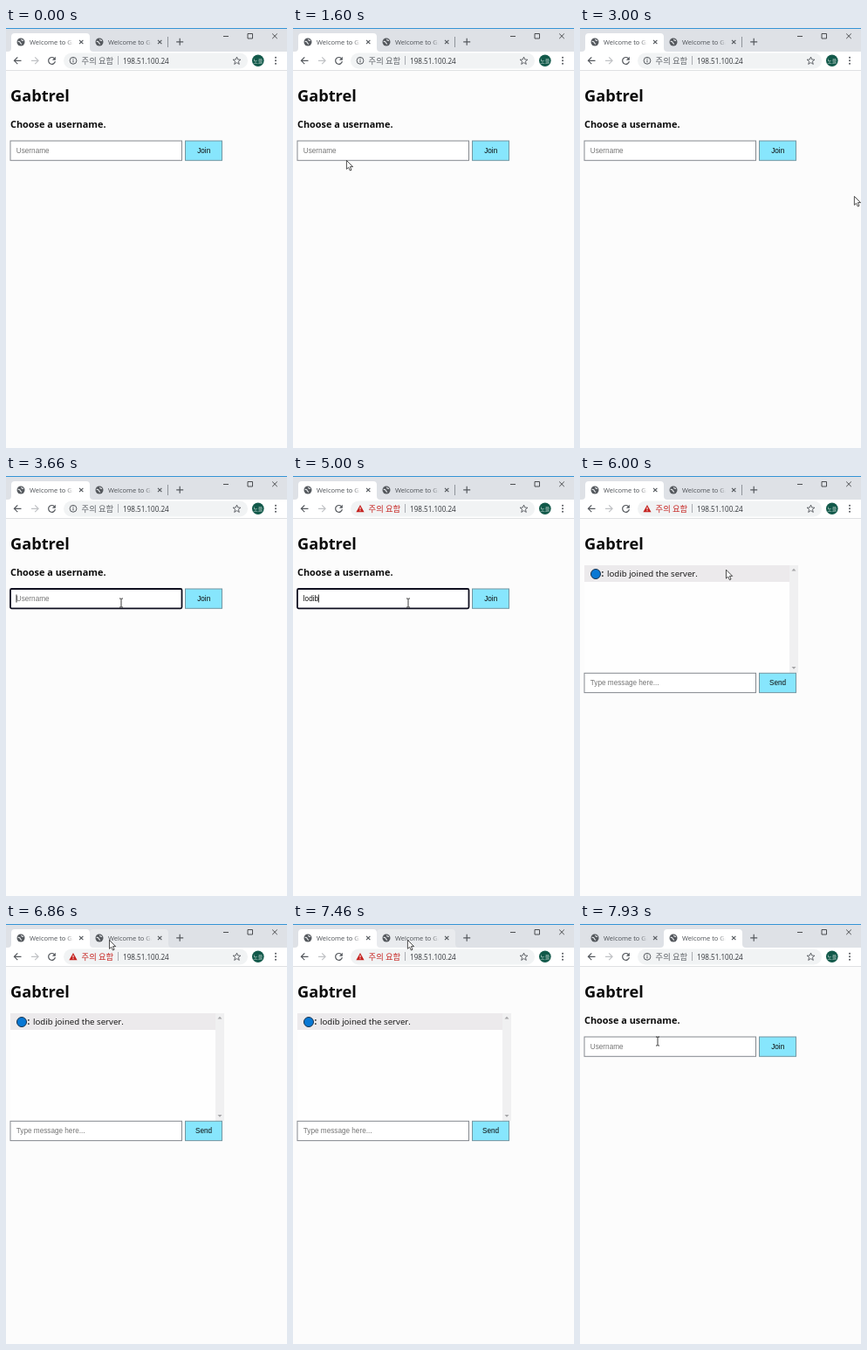
An HTML page that plays this animation: 322x480 px, repeating every 8 s.

```html
<!DOCTYPE html>
<html lang="en">
<head>
<meta charset="utf-8">
<title>Chat demo</title>
<style>
html, body { margin: 0; width: 100%; height: 100%; overflow: hidden; background: #fcfcfc; }
svg { display: block; width: 100%; height: 100%; }
text { font-family: "Open Sans", "Noto Sans", sans-serif; fill: #0c0c0c; white-space: pre; }
.ko { font-family: "Noto Sans CJK KR", "Noto Sans CJK", sans-serif; }
.form { font: 8.2px "Liberation Sans", Arial, sans-serif; }
.hint { fill: #757575; }
.btn { text-anchor: middle; }
.line { fill: none; stroke: #55595e; stroke-width: 1.2; }
.field { fill: #fff; stroke: #85898f; }
.button { fill: #87e6fd; stroke: #7396a2; }
</style>
</head>
<body>
<svg viewBox="0 0 322 480">
  <defs>
    <linearGradient id="fade" gradientUnits="userSpaceOnUse" x1="69" x2="77" y1="0" y2="0">
      <stop stop-color="#4b4f54"/><stop offset="1" stop-color="#4b4f54" stop-opacity="0"/>
    </linearGradient>
    <g id="tab">
      <circle cx="17" cy="16" r="4.5" fill="#55595e"/>
      <path d="M13.7 15.4q2.4-.2 2.8 1.4t1.6 1.2M17.6 12.8q0 1.7 2.4 1.6" fill="none" stroke="#e8eaed" stroke-width="1.1"/>
      <text x="27" y="18.6" font-size="7.5" style="fill:url(#fade)">Welcome to Gabtrel</text>
      <path class="line" d="M84 13.8l4.4 4.4m0-4.4L84 18.2"/>
    </g>
    <path id="shape" d="M2 27Q6 27 6 23V10Q6 6 10 6H92Q96 6 96 10V23Q96 27 100 27Z"/>
  </defs>

  <rect width="322" height="480" fill="#fcfcfc"/>
  <rect width="322" height="27" fill="#dee1e6"/>
  <rect width="322" height="1" fill="#3594d6"/>
  <use id="hover" href="#shape" x="90" fill="#e9ebee"/>
  <use id="active" href="#shape" fill="#fff"/>
  <use href="#tab"/>
  <use href="#tab" x="90"/>
  <path id="divider" d="M185.5 10v12" stroke="#8f949a"/>
  <path class="line" d="M195.2 15.8h8m-4-4v8"/>
  <path d="M249 9.5h6M277 6.5h5.5V12H277zM305.2 6.5l5.6 5.6m0-5.6l-5.6 5.6" fill="none" stroke="#3c3e40" stroke-width=".9"/>

  <rect y="27" width="322" height="21" fill="#fff"/>
  <path d="M0 48.5h322" stroke="#dfe1e3"/>
  <path class="line" d="M17.5 37.3h-8m3.8-3.9l-3.9 3.9 3.9 3.9"/>
  <path class="line" style="stroke:#c0c2c5" d="M29 37.3h8m-3.8-3.9l3.9 3.9-3.9 3.9"/>
  <path class="line" d="M55.4 34.7a3.9 3.9 0 1 0 1 3.5"/>
  <path d="M56.8 32.8v3.9h-3.9z" fill="#55595e"/>
  <rect x="66" y="28.5" width="211" height="18" rx="9" fill="#f1f3f4"/>
  <g id="info" class="line" style="stroke-width:1">
    <circle cx="77" cy="37.3" r="3.9"/><path d="M77 36.6v2.8M77 34.8v1"/>
  </g>
  <g id="warn">
    <path d="M77 33l4.6 8.2h-9.2z" fill="#c5221f"/>
    <path d="M77 35.7v2.7m0 .8v1" stroke="#fff"/>
  </g>
  <text id="notice" class="ko" x="86.6" y="40.7" font-size="9.4">주의 요함</text>
  <path d="M128.5 32v10" stroke="#a9adb2"/>
  <text x="134" y="40.8" font-size="8.1" style="fill:#303338">198.51.100.24</text>
  <path class="line" style="stroke-width:.9" d="M264.5 33l1.2 3 3.2.2-2.5 2 .9 3.2-2.8-1.8-2.8 1.8.9-3.2-2.5-2 3.2-.2z"/>
  <circle cx="288.8" cy="37.3" r="6.8" fill="#12594a"/>
  <text class="ko" x="288.8" y="39.5" font-size="6" text-anchor="middle" style="fill:#d5e5df">노을</text>
  <g fill="#55595e"><circle cx="309" cy="33.8" r="1"/><circle cx="309" cy="37.3" r="1"/><circle cx="309" cy="40.8" r="1"/></g>

  <text x="5" y="83.5" font-size="18.2" font-weight="700">Gabtrel</text>

  <g id="login">
    <text x="5" y="114" font-size="10.9" font-weight="700">Choose a username.</text>
    <rect id="field" class="field" x="5" y="129" width="196.5" height="22.3"/>
    <text id="hint" class="form hint" x="11.8" y="143">Username</text>
    <text id="typed" class="form" x="11.8" y="143"></text>
    <path id="caret" d="M.5 135.5v9" stroke="#111" stroke-width=".9"/>
    <rect class="button" x="205.5" y="129" width="42" height="22.3"/>
    <text class="form btn" x="226.7" y="142.9">Join</text>
  </g>

  <g id="chat">
    <rect x="5" y="102" width="235" height="123" fill="#fefefe"/>
    <rect x="5" y="102" width="235" height="19" fill="#eceaec"/>
    <rect x="240" y="102" width="10" height="123" fill="#f0f0f1"/>
    <path d="M242.5 108.5h5l-2.5-2.8zM242.5 218h5l-2.5 2.8z" fill="#a5a5a8"/>
    <circle cx="18" cy="112" r="5.5" fill="#0878d4" stroke="#17324e"/>
    <text x="24.6" y="115.3" font-size="9.7" font-weight="700">:</text>
    <text x="31" y="115.3" font-size="9.7">lodib joined the server.</text>
    <rect class="field" x="5" y="225.3" width="196.5" height="22.3"/>
    <text class="form hint" x="11.8" y="239.2">Type message here...</text>
    <rect class="button" x="205.5" y="225.3" width="42" height="22.3"/>
    <text class="form btn" x="226.5" y="239.2">Send</text>
  </g>

  <g id="pointer">
    <path id="arrow" d="M.4.4V10.3L2.6 8.3 4.4 12 6 11.2 4.4 7.6H7.6Z" fill="#fff" stroke="#222" stroke-width=".8"/>
    <path id="beam" d="M-2-5H-.5L0-4.5.5-5H2M0-4.5V4.5M-2 5H-.5L0 4.5.5 5H2" fill="none" stroke="#222" stroke-width=".9"/>
  </g>
</svg>
<script>
const $ = id => document.getElementById(id);
const show = (id, on) => $(id).style.display = on ? '' : 'none';

const LOOP = 8000, FOCUS = 3600, JOIN = 5200, SWITCH = 7600;
const NAME = 'lodib', KEYS = [4460, 4600, 4730, 4860, 5000];

// Pointer visits: time, x, y
const VISITS = [
  { end: 2060, path: [[1400, 66, 152], [1600, 61, 151], [1730, 61, 151], [1800, 60, 149]] },
  { end: LOOP, path: [
    [3000, 314, 192], [3060, 312, 191], [3200, 240, 172], [3400, 165, 140], [3530, 136, 129], [3660, 132, 145],
    [5800, 132, 145], [6000, 167, 107], [6150, 176, 70], [6330, 130, 24], [6500, 76, 18], [6660, 118, 18],
    [6860, 118, 18], [7200, 150, 24], [7460, 131, 18], [7660, 131, 20], [7930, 89, 134]
  ] }
];

function pointerAt(t) {
  const visit = VISITS.find(v => t >= v.path[0][0] && t < v.end);
  if (!visit) return null;
  const { path } = visit;
  const next = path.findIndex(p => p[0] > t);
  if (next < 0) return path[path.length - 1].slice(1);
  const [t0, x0, y0] = path[next - 1], [t1, x1, y1] = path[next];
  const k = (t - t0) / (t1 - t0);
  return [x0 + (x1 - x0) * k, y0 + (y1 - y0) * k];
}

function draw(t) {
  const second = t >= SWITCH;
  const chatting = t >= JOIN && !second;
  const focused = t >= FOCUS && t < JOIN;
  const unsafe = t >= KEYS[0] && !second;
  const count = focused ? KEYS.filter(k => t >= k).length : 0;

  show('login', !chatting);
  show('chat', chatting);
  show('info', !unsafe);
  show('warn', unsafe);
  $('notice').style.fill = unsafe ? '#c5221f' : '#5f6368';
  $('active').setAttribute('x', second ? 90 : 0);

  $('field').style.cssText = focused ? 'stroke:#101020;stroke-width:1.8;rx:1.5px' : '';
  show('hint', !count);
  $('typed').textContent = NAME.slice(0, count);
  show('caret', focused && (t < 4130 || count));
  const end = count ? $('typed').getComputedTextLength() : 0;
  $('caret').setAttribute('transform', `translate(${11.5 + end})`);

  const pos = pointerAt(t);
  const [x, y] = pos || [0, 99];
  const hovered = !second && y < 27 && x > 96 && x < 186;
  show('hover', hovered);
  show('divider', !second && !hovered);
  show('pointer', pos);
  const overField = x < 202 && y > 128 && y < 148;
  const beam = overField && (!chatting || t < 5860);
  show('beam', beam);
  show('arrow', !beam);
  $('pointer').setAttribute('transform', `translate(${x} ${y})`);
}

const start = performance.now();
function tick() {
  draw((performance.now() - start) % LOOP);
  requestAnimationFrame(tick);
}
tick();
</script>
</body>
</html>
```
